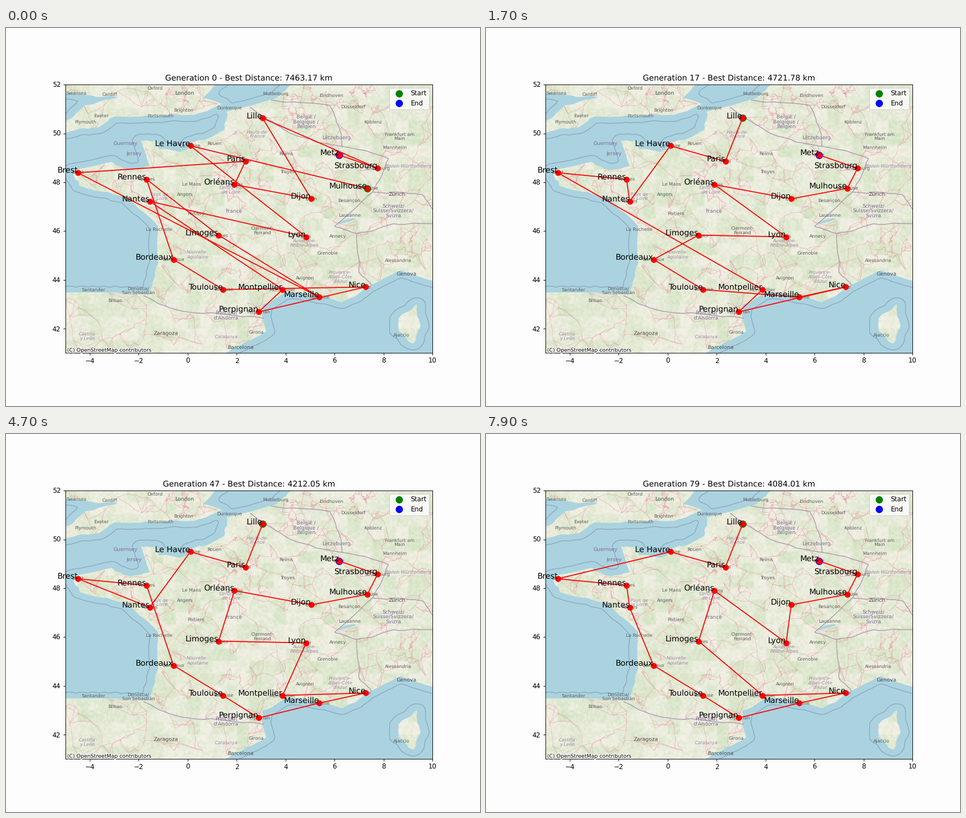
Animation, 837 px wide and 669 px high, one loop 8 s. Source, as a matplotlib script:

```python
import numpy as np
import matplotlib.pyplot as plt
from matplotlib import patheffects
from matplotlib.animation import FuncAnimation
from matplotlib.collections import LineCollection
from matplotlib.lines import Line2D
from matplotlib.patches import Ellipse, PathPatch
from matplotlib.path import Path

plt.rcParams["text.hinting"] = "no_hinting"
DPI = 83.7
EXTENT = (-5, 10, 41, 52)
SEA, LAND, GREEN = "#aad3df", (.95, .94, .9), (.8, .88, .73)
ROAD, BORDER, SEA_BORDER = "#e88f9b", "#a78cac", "#8b9cbd"
rng = np.random.default_rng(11)

CITIES = {
    "Paris": (2.3522, 48.8566), "Marseille": (5.3698, 43.2965),
    "Lyon": (4.8357, 45.7640), "Toulouse": (1.4442, 43.6047),
    "Nice": (7.2620, 43.7102), "Nantes": (-1.5536, 47.2184),
    "Strasbourg": (7.7521, 48.5734), "Montpellier": (3.8767, 43.6108),
    "Bordeaux": (-0.5792, 44.8378), "Lille": (3.0573, 50.6292),
    "Rennes": (-1.6778, 48.1173), "Le_Havre": (0.1079, 49.4944),
    "Dijon": (5.0415, 47.3220), "Brest": (-4.4861, 48.3904),
    "Limoges": (1.2611, 45.8336), "Perpignan": (2.8956, 42.6887),
    "Orléans": (1.9093, 47.9029), "Metz": (6.1757, 49.1193),
    "Mulhouse": (7.3359, 47.7508),
}

# first generation, best distance, visiting order
NORTH, EAST = "Lille Paris Le_Havre ", " Dijon Mulhouse Strasbourg Metz"
WEST, SOUTH = NORTH + "Nantes Brest Rennes ", "Perpignan Marseille Nice Montpellier "
COAST = "Brest Montpellier Perpignan Nice Marseille Toulouse Bordeaux Limoges "
BESTS = [
    (0, 7463.17, "Mulhouse Le_Havre Lyon Nantes Montpellier Perpignan Nice Toulouse "
     "Bordeaux Rennes Limoges Marseille Brest Paris Orléans Dijon Lille Strasbourg Metz"),
    (3, 6078.43, "Mulhouse Lyon Le_Havre Nantes Rennes Bordeaux Toulouse Perpignan Nice "
     "Montpellier Limoges Marseille Brest Paris Orléans Dijon Lille Metz Strasbourg"),
    (5, 5246.89, "Mulhouse Lyon Le_Havre Nantes Rennes " + COAST
     + "Paris Orléans Dijon Lille Metz Strasbourg"),
    (12, 4721.78, NORTH + "Nantes Rennes " + COAST + "Lyon Orléans" + EAST),
    (18, 4712.59, NORTH + "Nantes Rennes Brest Montpellier Perpignan Marseille Nice "
     "Toulouse Bordeaux Limoges Lyon Orléans" + EAST),
    (22, 4585.82, WEST + "Toulouse " + SOUTH + "Bordeaux Limoges Lyon Orléans" + EAST),
    (30, 4493.76, WEST + "Bordeaux " + SOUTH + "Toulouse Limoges Lyon Orléans" + EAST),
    (34, 4375.31, WEST + "Bordeaux Toulouse " + SOUTH + "Limoges Lyon Orléans" + EAST),
    (41, 4212.05, WEST + "Bordeaux Toulouse " + SOUTH + "Lyon Limoges Orléans" + EAST),
    (76, 4084.01, NORTH + "Brest Rennes Nantes Bordeaux Toulouse " + SOUTH
     + "Limoges Orléans Lyon" + EAST),
]

# key points of the coasts and borders, lon / lat
MAINLAND = [
    (10.5, 52.3), (4.4, 52.2), (3.5, 51.4), (1.6, 50.9), (1.5, 50.15), (.1, 49.6),
    (-.2, 49.28), (-1.2, 49.36), (-1.3, 49.68), (-1.9, 49.7), (-1.55, 48.65),
    (-2.6, 48.55), (-3.1, 48.83), (-4.7, 48.5), (-4.4, 47.85), (-2.5, 47.4),
    (-1.2, 46.2), (-1.2, 44.7), (-1.6, 43.4), (-5.3, 43.45), (-5.3, 40.8), (.75, 40.8),
    (2.2, 41.35), (3.2, 41.9), (3.05, 43), (4, 43.5), (5.2, 43.35), (6.3, 43.1),
    (7.3, 43.7), (8.7, 44.4), (10.5, 43.8), (10.5, 52.3)]
BRITAIN = [
    (-5.3, 52.3), (-5.3, 51.65), (-3.9, 51.55), (-2.8, 51.5), (-4.2, 51.15),
    (-5.3, 50.3), (-5.3, 50), (-3.7, 50.25), (-3, 50.7), (-1.3, 50.72), (.25, 50.76),
    (1.4, 51.2), (.6, 51.45), (1.6, 52.3), (-5.3, 52.3)]
CORSICA = [(9.35, 43), (9.5, 42.1), (9.2, 41.4), (8.6, 41.9), (8.6, 42.4), (9.35, 43)]
BORDERS = [
    [(-1.8, 43.35), (-.7, 42.85), (1.4, 42.6), (3.1, 42.43)],
    [(2.55, 51.08), (4.2, 50), (6.3, 49.47), (8.2, 48.97), (7.55, 47.6), (6, 46.2),
     (6.9, 45.9), (7, 44.3), (7.5, 43.78)],
    [(3.4, 51.37), (5.8, 51.15), (6.2, 50.2), (6.3, 49.47)],
    [(7.55, 47.6), (9.5, 47.5), (10, 46.9)],
    [(6.9, 45.9), (8.4, 46.3), (10, 46.3)],
]

# map lettering: name, stage x, stage y
TOWNS = [
    ("Swansea", 125, 116), ("Cardiff", 183, 117), ("Oxford", 263, 106),
    ("Exeter", 168, 156), ("Plymouth", 140, 166), ("Portsmouth", 273, 156),
    ("Brighton", 314, 145), ("Dunkerque", 394, 141), ("Middelburg", 476, 116),
    ("Eindhoven", 575, 119), ("Düsseldorf", 613, 139), ("Koblenz", 648, 167),
    ("Frankfurt am\nMain", 695, 192), ("Mannheim", 687, 212), ("Reims", 495, 223),
    ("Troyes", 497, 255), ("Rouen", 368, 205), ("Le Mans", 328, 277),
    ("Angers", 316, 295), ("Poitiers", 335, 329), ("La Rochelle", 270, 357),
    ("Clermont-\nFerrand", 453, 359), ("Besançon", 606, 306), ("Lausanne", 607, 332),
    ("Annecy", 586, 369), ("Grenoble", 568, 399), ("Avignon", 528, 442),
    ("Alessandria", 693, 412), ("Santander", 155, 464), ("Bilbao", 193, 483),
    ("Donostia/\nSan Sebastián", 234, 465), ("Girona", 442, 539), ("Ajaccio", 698, 543)]
BIG_TOWNS = [("London", 315, 115), ("Zürich", 690, 294), ("Genova", 707, 435),
             ("Zaragoza", 282, 541), ("Barcelona", 414, 566)]
REGIONS = [
    ("Hauts-de-\nFrance", 444, 188), ("Baden-Württemberg", 711, 244),
    ("Pays de\nla Loire", 271, 298), ("Centre-Val\nde Loire", 397, 287),
    ("Nouvelle-\nAquitaine", 338, 401), ("Auvergne-\nRhône-Alpes", 527, 381),
    ("Provence-\nAlpes-Côte\nd'Azur", 590, 441), ("Castilla\ny León", 143, 546),
    ("Catalunya", 389, 546)]
COUNTRIES = [
    ("France", 402, 324), ("België /\nBelgique /\nBelgien", 530, 166),
    ("Lëtzebuerg", 583, 195), ("Schweiz/\nSuisse/Svizzera/\nSvizra", 684, 324),
    ("Guernsey", 211, 205), ("Jersey", 226, 223), ("Principat\nd'Andorra", 389, 509)]


def rough(points, amp=.05, cuts=3):
    """Halve every segment a few times, nudging each new midpoint."""
    pts = np.array(points, float)
    for _ in range(cuts):
        out = np.empty((2 * len(pts) - 1, 2))
        out[::2] = pts
        out[1::2] = (pts[1:] + pts[:-1]) / 2 + rng.normal(0, amp, (len(pts) - 1, 2))
        pts, amp = out, amp / 2
    return pts


def strokes(lines, color, width, alpha, clip=None):
    art = LineCollection(lines, colors=color, linewidths=width, alpha=alpha, zorder=.5)
    ax.add_collection(art, autolim=False)
    if clip is not None:
        art.set_clip_path(clip)


def letter(labels, size, color, **style):
    for name, x, y in labels:
        lon, lat = (x - 104.6) / 43.245 - 5, 52 - (y - 100) / 43.245
        ax.text(lon, lat, name, size=size, color=color, ha="center", va="center",
                linespacing=1, clip_on=True, zorder=.8, **style)


def on_land(paths, pts):
    return np.any([p.contains_points(pts) for p in paths], axis=0)


def road_net(paths):
    """Join scattered places on land to their nearest neighbours."""
    spots = [rng.uniform((-5, 41), (10, 52), (700, 2))]
    for hub in [(-.1, 51.5), (7, 51.4), (4.4, 51), (9.1, 45.4), CITIES["Paris"]]:
        spots.append(rng.normal(hub, .4, (30, 2)))
    spots = np.vstack(spots)
    spots = spots[on_land(paths, spots)]
    gap = np.hypot(*(spots[:, None] - spots[None]).transpose(2, 0, 1))
    near = np.argsort(gap, axis=1)[:, 1:4]
    pairs = {tuple(sorted((i, j))) for i, row in enumerate(near) for j in row}
    return [rough([spots[i], spots[j]], .04, 2) for i, j in sorted(pairs)]


def sea_limits(paths):
    """Trace a line at a fixed distance off every coast."""
    x, y = np.meshgrid(np.linspace(-5, 10, 130), np.linspace(41, 52, 96))
    grid = np.column_stack([x.ravel(), y.ravel()])
    shore = np.vstack([p.vertices for p in paths])
    dx, dy = (grid[:, None] - shore[None]).transpose(2, 0, 1)
    off = np.hypot(.75 * dx, dy).min(axis=1)
    off[on_land(paths, grid)] = 0
    ax.contour(x, y, off.reshape(x.shape), levels=[.27], colors=SEA_BORDER,
               linewidths=1.2, alpha=.8, zorder=.5)


def draw_map():
    ax.set_facecolor(SEA)
    paths = [Path(rough(c)) for c in (MAINLAND, BRITAIN, CORSICA)]
    land = PathPatch(Path.make_compound_path(*paths), fc=LAND, ec="none", zorder=.1)
    ax.add_patch(land)

    # woodland mottling, coarse patches plus fine speckle
    wood = np.kron(rng.random((22, 30)), np.ones((6, 6))) * .6
    wood = np.clip(wood + rng.random(wood.shape) * .6 - .25, 0, 1)[..., None]
    tint = np.array(LAND) * (1 - wood) + np.array(GREEN) * wood
    ax.imshow(tint, extent=EXTENT, interpolation="bilinear", zorder=.2).set_clip_path(land)
    ax.add_patch(Ellipse((6.5, 46.42), .75, .11, angle=15, fc=SEA, zorder=.3))

    strokes(road_net(paths), ROAD, .7, .5, land)
    strokes([rough(b) for b in BORDERS], BORDER, 1.3, .8)
    sea_limits(paths)

    letter(REGIONS, 6.9, "#a08aa8", style="italic")
    letter(TOWNS, 7, "#5c5a5c")
    letter(BIG_TOWNS, 8, "#4c4a4c")
    letter(COUNTRIES, 7.8, "#86689a")
    ax.text(.005, .005, "(C) OpenStreetMap contributors", size=8, transform=ax.transAxes,
            path_effects=[patheffects.withStroke(linewidth=2, foreground="w")])


def update(gen):
    _, km, order = [b for b in BESTS if b[0] <= gen][-1]
    lon, lat = np.array([CITIES[c] for c in order.split()]).T
    route.set_data(lon, lat)
    start.set_data(lon[:1], lat[:1])
    end.set_data(lon[-1:], lat[-1:])
    title.set_text(f"Generation {gen} - Best Distance: {km:.2f} km")
    return route, start, end, title


fig, ax = plt.subplots(figsize=(837 / DPI, 669 / DPI), dpi=DPI, facecolor="#fdfdfd")
draw_map()

dot = dict(marker="o", ls="none", ms=10, snap=False)
start, = ax.plot([], [], color="green", zorder=1.5, label="Start", **dot)
end, = ax.plot([], [], color="blue", zorder=1.6, label="End", **dot)
route, = ax.plot([], [], "ro-", lw=1.5, ms=8, zorder=2, snap=False)
for name, (lon, lat) in CITIES.items():
    label = name.replace("_", " ")
    ax.text(lon, lat, label, size=12, ha="right")
    ax.text(lon, lat, label, size=7, color="#5c5a5c", ha="center", va="center", zorder=.8)
title = ax.set_title("")
ax.set(xlim=EXTENT[:2], ylim=EXTENT[2:], aspect=.999)
ax.set_xticks(range(-4, 11, 2))
ax.set_yticks(range(42, 53, 2))
ax.legend(handles=[Line2D([], [], color=c, label=s, **dot)
                   for c, s in (("green", "Start"), ("blue", "End"))], loc="upper right")

anim = FuncAnimation(fig, update, frames=80, interval=100, repeat=True,
                     repeat_delay=0, init_func=lambda: update(0))
plt.show()
```
